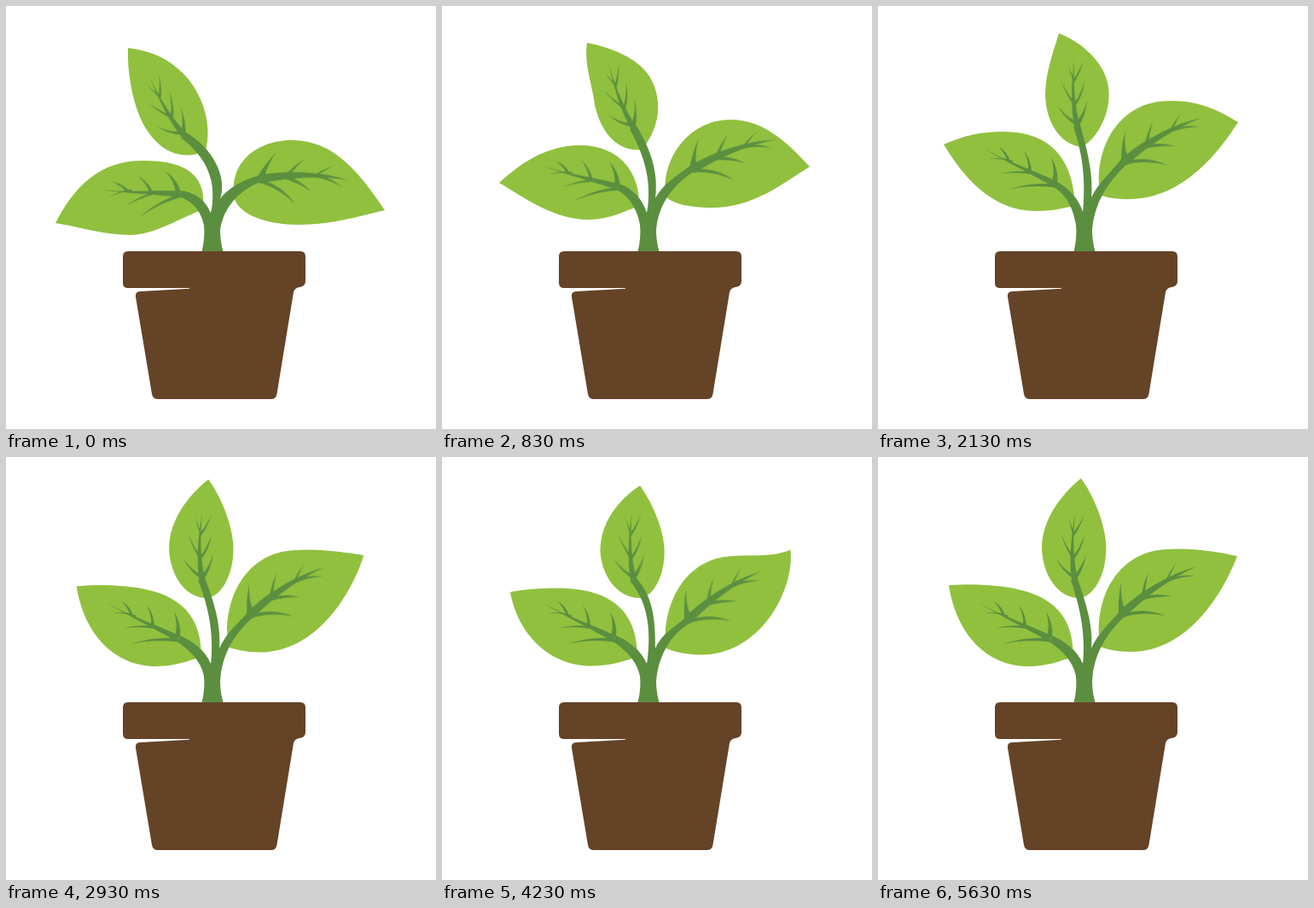
Recreate the animation shown at these times as an HTML page without scripts. Size 504x495 px, loop 5.73 s.

```html
<!DOCTYPE html>
<html lang="en">
<head>
<meta charset="utf-8">
<title>Potted plant</title>
<style>
html, body { margin: 0; width: 100%; height: 100%; overflow: hidden; background: #fff; }
svg { display: block; width: 504px; height: 495px; }
.leaf { fill: #91c03e; }
.stem { fill: #5b8f3f; }
.pot { fill: #654327; }
.leaf, .branch, .veins { animation: 5.73s linear infinite; }

/* Each pose moves to the next in 100 ms steps. */
.left .leaf { animation-name: left-leaf; }
.left .branch { animation-name: left-branch; }
.left .veins { animation-name: left-veins; }
.top .leaf { animation-name: top-leaf; }
.top .branch { animation-name: top-branch; }
.top .veins { animation-name: top-veins; }
.right .leaf { animation-name: right-leaf; }
.right .branch { animation-name: right-branch; }
.right .veins { animation-name: right-veins; }

@keyframes left-leaf {
  0%, .5236% { d: path("M231 238C235 201 215 181 162 181C112 180 81 209 58 254C88 259 117 268 145 268C173 268 200 250 231 238"); animation-timing-function: steps(8); }
  14.4852% { d: path("M231 236C233 195 208 163 162 163C120 163 90 186 67 207C95 223 130 250 172 250C196 250 214 240 231 234"); animation-timing-function: steps(4); }
  21.466% { d: path("M231 234C230 185 204 152 158 152C122 152 98 163 72 179C98 207 134 242 184 242C204 242 217 236 231 234"); animation-timing-function: steps(9); }
  37.173% { d: path("M231 234C229 180 203 147 147 147C120 147 100 152 77 162C99 198 132 240 186 240C206 240 218 236 231 234"); animation-timing-function: steps(7); }
  63.351% { d: path("M229 234C229 192 210 153 135 153C115 153 100 154 80 159C89 208 126 244 175 244C198 244 212 239 229 234"); animation-timing-function: steps(12); }
  84.293% { d: path("M229 234C229 192 211 154 136 154C115 154 100 155 80 157C88 205 125 245 174 245C198 245 212 239 229 234"); animation-timing-function: steps(8); }
  49.389%, 98.255%, to { d: path("M229 234C229 188 208 158 140 151C120 149 103 149 83 150C92 208 128 245 176 245C198 245 212 239 229 234"); animation-timing-function: steps(8); }
}
@keyframes top-leaf {
  0%, .5236% { d: path("M234 170C243 135 228 95 201 73C184 58 165 52 143 49C142 75 147 106 157 130C168 156 194 186 234 170"); animation-timing-function: steps(8); }
  14.4852% { d: path("M234 168C252 148 262 113 243 82C229 61 200 49 170 43C166 66 176 92 179 115C184 142 203 172 234 168"); animation-timing-function: steps(4); }
  21.466% { d: path("M236 166C257 162 278 118 259 82C246 60 215 43 184 40C183 60 191 80 191 102C192 130 212 162 236 166"); animation-timing-function: steps(9); }
  37.173% { d: path("M238 165C256 158 280 118 267 83C260 62 235 40 212 32C205 55 196 80 196 104C197 137 214 162 238 165"); animation-timing-function: steps(7); }
  63.351% { d: path("M231 165C250 164 262 132 260 106C258 82 246 53 232 34C206 51 185 78 185 110C186 138 204 165 231 165"); animation-timing-function: steps(12); }
  84.293% { d: path("M232 165C251 164 263 132 261 105C259 81 246 52 232 33C206 50 186 77 186 109C187 137 205 165 232 165"); animation-timing-function: steps(8); }
  49.389%, 98.255%, to { d: path("M236 165C256 163 270 130 267 99C265 75 252 44 238 25C213 45 192 75 192 107C193 137 210 165 236 165"); animation-timing-function: steps(8); }
}
@keyframes right-leaf {
  0%, .5236% { d: path("M268 226C260 182 296 157 335 157C385 157 415 196 444 239C410 247 380 256 343 256C305 256 274 244 268 226"); animation-timing-function: steps(8); }
  14.4852% { d: path("M262 222C257 178 290 133 338 133C378 133 406 161 431 188C400 207 366 236 316 236C290 236 268 231 262 222"); animation-timing-function: steps(4); }
  21.466% { d: path("M260 221C254 172 286 119 341 119C376 119 402 136 425 161C396 183 360 228 298 228C282 228 266 225 260 221"); animation-timing-function: steps(9); }
  37.173% { d: path("M260 221C252 164 284 109 345 111C376 111 400 122 422 136C400 170 358 226 294 226C280 226 266 224 260 221"); animation-timing-function: steps(7); }
  63.351% { d: path("M262 224C258 170 286 119 340 116C362 114 386 118 408 107C414 155 374 232 304 232C286 232 270 228 262 224"); animation-timing-function: steps(12); }
  84.293% { d: path("M262 223C258 169 286 118 340 116C362 114 386 118 409 110C413 156 373 231 303 231C286 231 270 227 262 223"); animation-timing-function: steps(8); }
  49.389%, 98.255%, to { d: path("M260 222C252 161 284 109 340 108C366 106 394 110 421 116C405 158 364 228 296 228C282 228 268 225 260 222"); animation-timing-function: steps(8); }
}

@keyframes left-branch {
  0%, .5236% { d: path("M233 262C230 240 219 229 204 223.5L205 216C222 218 235 228 240 243L244 262Z"); animation-timing-function: steps(8); }
  14.4852% { d: path("M233 262C230 239 221 225 206 215.5L208 208C224 214 235 226 240 242L244 262Z"); animation-timing-function: steps(4); }
  21.466% { d: path("M233 262C230 239 223 222 209 212.5L211 205C226 214 236 227 240 241L244 262Z"); animation-timing-function: steps(9); }
  37.173% { d: path("M233 262C230 239 222 222 207 212.5L209 205C225 214 236 227 240 241L244 262Z"); animation-timing-function: steps(7); }
  49.389%, 63.351%, 84.293%, 98.255%, to { d: path("M233 262C231 244 221 230 202 217L204 209C220 216 234 227 240 242L244 262Z"); animation-timing-function: steps(8); }
}
@keyframes top-branch {
  0%, .5236% { d: path("M240 244C248 205 236 178 205 154L211 148C242 166 260 200 251 226Z"); animation-timing-function: steps(8); }
  14.4852% { d: path("M240 244C246 210 240 180 220 144L228 140C245 169 254 195 250 226Z"); animation-timing-function: steps(4); }
  21.466% { d: path("M240 244C245 210 243 185 229 140L237 138C246 165 253 195 250 226Z"); animation-timing-function: steps(9); }
  37.173% { d: path("M240 244C243 210 242 180 229 141L237 139C244 165 253 195 250 226Z"); animation-timing-function: steps(7); }
  63.351%, 84.293% { d: path("M240 244C244 215 246 174 220 145L228 142C249 165 250 195 250 226Z"); animation-timing-function: steps(8); }
  49.389%, 98.255%, to { d: path("M240 244C243 215 240 185 226 144L234 142C242 168 253 195 250 226Z"); animation-timing-function: steps(8); }
}
@keyframes right-branch {
  0%, .5236% { d: path("M250 227C258 215 275 204 297 198L298 206C276 214 255 234 251 262L245 262Z"); animation-timing-function: steps(8); }
  14.4852% { d: path("M250 225C259 208 276 198 292 186L296 193C271 209 254 231 251 262L245 262Z"); animation-timing-function: steps(4); }
  21.466% { d: path("M250 224C259 206 274 196 288 181L293 188C269 206 254 230 251 262L245 262Z"); animation-timing-function: steps(9); }
  37.173% { d: path("M250 224C259 206 273 195 286 178L292 185C269 206 254 230 251 262L245 262Z"); animation-timing-function: steps(7); }
  63.351%, 84.293% { d: path("M250 224C258 206 270 202 286 187L291 194C270 206 254 230 251 262L245 262Z"); animation-timing-function: steps(8); }
  49.389%, 98.255%, to { d: path("M250 224C258 206 270 196 283 181L289 187C268 206 253 230 251 262L245 262Z"); animation-timing-function: steps(8); }
}

@keyframes left-veins {
  0%, .5236% { transform: translate(205px, 220px) rotate(-23.5deg); animation-timing-function: steps(8); }
  14.4852% { transform: translate(208px, 212px) rotate(-11deg); animation-timing-function: steps(4); }
  21.466% { transform: translate(211px, 209px) rotate(-4deg); animation-timing-function: steps(9); }
  37.173% { transform: translate(209px, 209px) rotate(0deg); animation-timing-function: steps(7); }
  49.389%, 63.351%, 84.293%, 98.255%, to { transform: translate(203px, 213px) rotate(0deg); animation-timing-function: steps(8); }
}
@keyframes top-veins {
  0%, .5236% { transform: translate(208px, 151px) rotate(-31deg); animation-timing-function: steps(8); }
  14.4852% { transform: translate(224px, 142px) rotate(-22deg); animation-timing-function: steps(4); }
  21.466% { transform: translate(233px, 139px) rotate(-11deg); animation-timing-function: steps(9); }
  37.173% { transform: translate(233px, 140px) rotate(-3deg); animation-timing-function: steps(7); }
  63.351%, 84.293% { transform: translate(224px, 143px) rotate(-2deg); animation-timing-function: steps(8); }
  49.389%, 98.255%, to { transform: translate(230px, 143px) rotate(0deg); animation-timing-function: steps(8); }
}
@keyframes right-veins {
  0%, .5236% { transform: translate(298px, 202px) rotate(33deg); animation-timing-function: steps(8); }
  14.4852% { transform: translate(294px, 190px) rotate(13deg); animation-timing-function: steps(4); }
  21.466% { transform: translate(291px, 184px) rotate(6deg); animation-timing-function: steps(9); }
  37.173% { transform: translate(289px, 181px) rotate(3deg); animation-timing-function: steps(7); }
  63.351%, 84.293% { transform: translate(288px, 190px) rotate(-1deg); animation-timing-function: steps(8); }
  49.389%, 98.255%, to { transform: translate(286px, 183px) rotate(0deg); animation-timing-function: steps(8); }
}
</style>
</head>
<body>
<svg viewBox="0 0 504 495">
  <g class="left">
    <path class="leaf"/>
    <path class="stem branch"/>
    <g class="stem veins">
      <path d="M0-4C-25-16-58-27-86-43C-60-27-28-12-1 4Z"/>
      <path d="M1-2Q3-17-6-32Q-1-15-5-5Z"/>
      <path d="M-29-14Q-29-28-38-40Q-32-27-33-17Z"/>
      <path d="M-54-27Q-57-38-68-45Q-60-36-58-29Z"/>
      <path d="M2 4Q-28-1-57 6Q-25-4 0 0Z"/>
      <path d="M-24-11Q-42-15-65-13Q-42-18-27-14Z"/>
      <path d="M-51-26Q-64-31-80-30Q-64-33-51-28Z"/>
    </g>
  </g>
  <g class="top">
    <path class="leaf"/>
    <path class="stem branch"/>
    <g class="stem veins">
      <path d="M4 0C-1-22-2-45 1-78C-4-48-6-22-3 1Z"/>
      <path d="M0 0Q-14-9-22-25Q-12-11-2-6Z"/>
      <path d="M-3-25Q-11-38-16-54Q-10-40-3-30Z"/>
      <path d="M-1-51Q-5-62-7-75Q-4-62 0-55Z"/>
      <path d="M2 1Q11-11 14-30Q9-14 0-5Z"/>
      <path d="M-2-21Q9-34 12-52Q7-37-2-26Z"/>
      <path d="M-1-50Q7-60 12-76Q6-63 0-56Z"/>
    </g>
  </g>
  <g class="right">
    <path class="leaf"/>
    <path class="stem branch"/>
    <g class="stem veins">
      <path d="M-3-3C20-24 50-44 88-55C56-41 28-20 3 5Z"/>
      <path d="M-4 4Q-5-18-1-36Q-2-18 3-6Z"/>
      <path d="M22-17Q24-33 31-48Q27-32 27-22Z"/>
      <path d="M49-35Q55-48 64-60Q57-47 54-39Z"/>
      <path d="M-3 6Q24-3 51 3Q26-7 4 0Z"/>
      <path d="M22-15Q40-20 59-20Q40-24 26-20Z"/>
      <path d="M50-35Q66-43 86-44Q66-46 54-40Z"/>
    </g>
  </g>
  <path class="stem" d="M229 289C233 275 233 262 231.5 250L240 241L250 225L252 250C250 262 251 275 255 289Z"/>
  <path class="pot" d="M143 287H345q6 0 6 6V322q0 6-7 7q-6 1-7 6L317.5 454q-1 6-7 6H178q-6 0-7-6L152 340.5q-1-6 5-6.5L215 330.7V330H143q-6 0-6-6V293q0-6 6-6Z"/>
</svg>
</body>
</html>
```
